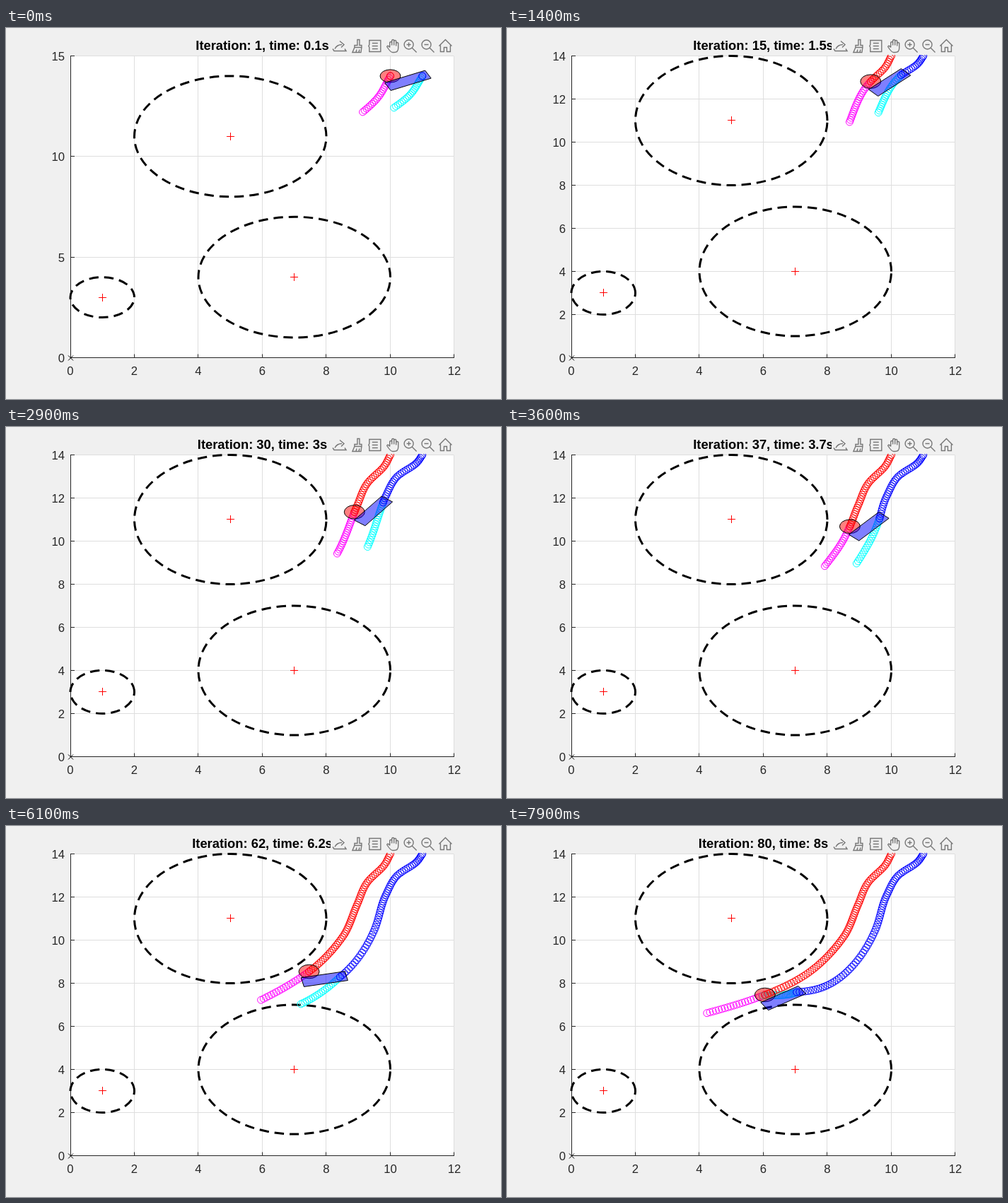
Animation, 700 px wide and 525 px high, one loop 8 s. Source, as an HTML page with a canvas:

```html
<!DOCTYPE html>
<html lang="en">
<head>
<meta charset="utf-8">
<title>Path tracking</title>
<style>
html, body { margin: 0; width: 100%; height: 100%; overflow: hidden; background: #f0f0f0; }
canvas { display: block; }
</style>
</head>
<body>
<canvas id="c" width="700" height="525"></canvas>
<script>
const g = document.getElementById('c').getContext('2d');
const FONT = '"Liberation Sans", Arial, sans-serif';
const LEFT = 91, RIGHT = 633.5, TOP = 39.5, BASE = 466.5, UX = 45.25;
const STEPS = 80, STEP_MS = 100, HORIZON = 20, STRIDE = 0.1;
const DARK = '#262626', RAD = Math.PI / 180;

// Leader route: step, x, y in axis units.
const route = [
  [1, 10, 14], [7, 9.8, 13.46], [17, 9.26, 12.64], [27, 8.96, 11.64],
  [43, 8.5, 10.13], [62, 7.46, 8.54], [80, 6.05, 7.46], [100, 4.22, 6.67]
];
const obstacles = [[5, 11, 3], [7, 4, 3], [1, 3, 1]];

let yMax;
const px = x => LEFT + x * UX;
const py = y => BASE - y * (BASE - TOP) / yMax;
const crisp = v => Math.ceil(v) - 0.5;

// Cubic Hermite interpolation of the route.
function leader(k) {
  const n = route.length - 1;
  let i = 0;
  while (i < n - 1 && k > route[i + 1][0]) i++;
  const h = route[i + 1][0] - route[i][0], t = (k - route[i][0]) / h, u = 1 - t;
  return [1, 2].map(c => {
    const slope = j => {
      const a = route[Math.max(j - 1, 0)], b = route[Math.min(j + 1, n)];
      return (b[c] - a[c]) / (b[0] - a[0]);
    };
    return route[i][c] * u * u * (1 + 2 * t) + route[i + 1][c] * t * t * (3 - 2 * t)
      + h * t * u * (slope(i) * u - slope(i + 1) * t);
  });
}

function course(k) {
  const [x0, y0] = leader(k), [x1, y1] = leader(k + 0.5);
  return Math.atan2(y1 - y0, x1 - x0);
}

// The follower swings around the leader, a little faster as time goes on.
function swing(k) {
  const d = k - 6;
  return (6 + 20.5 * Math.sin((3.61 * d + 0.0175 * d * d) * RAD)) * RAD;
}
const beside = ([x, y], angle, gap) => [x + gap * Math.cos(angle), y + gap * Math.sin(angle)];
const follower = k => beside(leader(k), swing(k), 1);

// Planned places: the coming turns at half rate; late plans let the follower lag.
function plan(k) {
  const lead = [], follow = [], lag = Math.max(0, k - 55) / 27;
  let p = leader(k);
  for (let i = 0; i <= HORIZON; i++) {
    const ahead = k + i / 2;
    lead.push(p);
    follow.push(beside(p, swing(ahead), 1 + lag * i / HORIZON));
    p = beside(p, course(ahead), STRIDE);
  }
  return { lead, follow };
}

function line(color, ...pts) {
  g.strokeStyle = color;
  g.lineWidth = 1;
  g.beginPath();
  pts.forEach(([x, y]) => g.lineTo(x, y));
  g.stroke();
}

function text(str, x, y, font, align, color) {
  g.font = font + ' ' + FONT;
  g.textAlign = align;
  g.fillStyle = color;
  g.fillText(str, x, y);
}

function drawAxes() {
  g.fillStyle = '#fff';
  g.fillRect(LEFT, 39, RIGHT - LEFT + 0.5, BASE - 39);
  const xs = [], ys = [];
  for (let x = 0; x <= 12; x += 2) xs.push([x, x ? crisp(px(x)) : 91.5]);
  for (let y = 0; y <= yMax; y += yMax === 15 ? 5 : 2) ys.push([y, crisp(py(y))]);
  xs.forEach(([, x]) => line('#dedede', [x, TOP], [x, BASE]));
  ys.forEach(([, y]) => line('#dedede', [LEFT, y], [RIGHT, y]));
  line(DARK, [91.5, TOP - 0.5], [91.5, BASE], [RIGHT + 0.5, BASE]);
  xs.forEach(([v, x]) => {
    line(DARK, [x, BASE], [x, BASE - 5]);
    text(v, px(v), 491, '16.67px', 'center', DARK);
  });
  ys.forEach(([v, y]) => {
    line(DARK, [91.5, y], [97, y]);
    text(v, 83, y + 6.5, '16.67px', 'right', DARK);
  });
}

function drawObstacles() {
  for (const [cx, cy, r] of obstacles) {
    const x = px(cx), y = py(cy), mx = crisp(x), my = crisp(y);
    g.strokeStyle = '#000';
    g.lineWidth = 3;
    g.setLineDash([13.33, 8]);
    g.beginPath();
    g.ellipse(x, y, r * UX, y - py(cy + r), 0, 0, -2 * Math.PI, true);
    g.stroke();
    g.setLineDash([]);
    line('#f00', [mx - 5.5, my], [mx + 5.5, my]);
    line('#f00', [mx, my - 5.5], [mx, my + 5.5]);
  }
  line('#000', [88, 463.5], [95, 470.5]);
  line('#000', [88, 470.5], [95, 463.5]);
}

function ring([x, y], color) {
  g.strokeStyle = color;
  g.lineWidth = 1;
  g.beginPath();
  g.arc(px(x), py(y), 5, 0, 2 * Math.PI);
  g.stroke();
}

function patch(fill) {
  g.fillStyle = fill;
  g.fill();
  g.strokeStyle = '#000';
  g.lineWidth = 1;
  g.stroke();
}

function drawBodies(k) {
  const [rx, ry] = leader(k), r = 0.32;
  g.beginPath();
  g.ellipse(px(rx), py(ry), r * UX, py(ry) - py(ry + r), 0, 0, 2 * Math.PI);
  patch('rgba(255,0,0,.5)');

  const [bx, by] = follower(k), a = swing(k) + 206 * RAD, c = Math.cos(a), s = Math.sin(a);
  g.beginPath();
  for (const [u, v] of [[-0.2, -0.215], [1.2, -0.215], [1.2, 0.215], [-0.2, 0.215]])
    g.lineTo(px(bx + u * c - v * s), py(by + u * s + v * c));
  g.closePath();
  patch('rgba(0,0,255,.5)');
}

function drawMotion(k) {
  g.save();
  g.beginPath();
  g.rect(LEFT, 38, RIGHT - LEFT + 1, BASE - 38);
  g.clip();
  const { lead, follow } = plan(k);
  lead.forEach(p => ring(p, '#f0f'));
  follow.forEach(p => ring(p, '#0ff'));
  for (let i = 1; i <= k; i++) {
    ring(leader(i), '#f00');
    ring(follower(i), '#00f');
  }
  drawBodies(k);
  g.restore();
}

const lens = 'M4.5-2A6.5 6.5 0 1 1-8.5-2A6.5 6.5 0 1 1 4.5-2M3 3L9 9M-5-2H1';
const icons = [
  'M-10 4L-8 7H9L7 4M-7 4Q-4-2 3-2M0-7L6-2L2 2',
  'M0-9H3V-1H6V2H-4V-1H0ZM-4 2L-7 9H5L6 2M-2 9L-1 5M2 9L3 5',
  'M-8-8H8V8H-8V2L-9 0L-8-2ZM-4-4H4M-4 0H4M-4 4H4',
  'M-4 2V-5Q-2.5-7-1-5V-1V-8Q.5-10 2-8V-1V-7Q3.5-9 5-7V0V-4Q6.5-6 8-4V3Q8 9 2 9H0Q-3 9-8 1Q-7-2-4 2',
  lens + 'M-2-5V1',
  lens,
  'M-9 0L0-9L9 0M-7-1V8H-2V2H2V8H7V-1'
].map(d => new Path2D(d));

function drawToolbar() {
  g.fillStyle = '#f0f0f0';
  g.fillRect(459, 12, 176, 26);
  g.strokeStyle = '#777';
  g.lineWidth = 1.4;
  icons.forEach((icon, i) => {
    g.save();
    g.translate(472 + i * 24.9, 25.5);
    g.stroke(icon);
    g.restore();
  });
}

function draw(now) {
  const k = Math.floor(now / STEP_MS) % STEPS + 1;
  yMax = k === 1 ? 15 : 14;
  g.fillStyle = '#f0f0f0';
  g.fillRect(0, 0, 700, 525);
  drawAxes();
  drawObstacles();
  drawMotion(k);
  text(`Iteration: ${k}, time: ${k / 10}s`, 362.5, 31, 'bold 18.33px', 'center', '#000');
  drawToolbar();
  requestAnimationFrame(draw);
}
requestAnimationFrame(draw);
</script>
</body>
</html>
```
